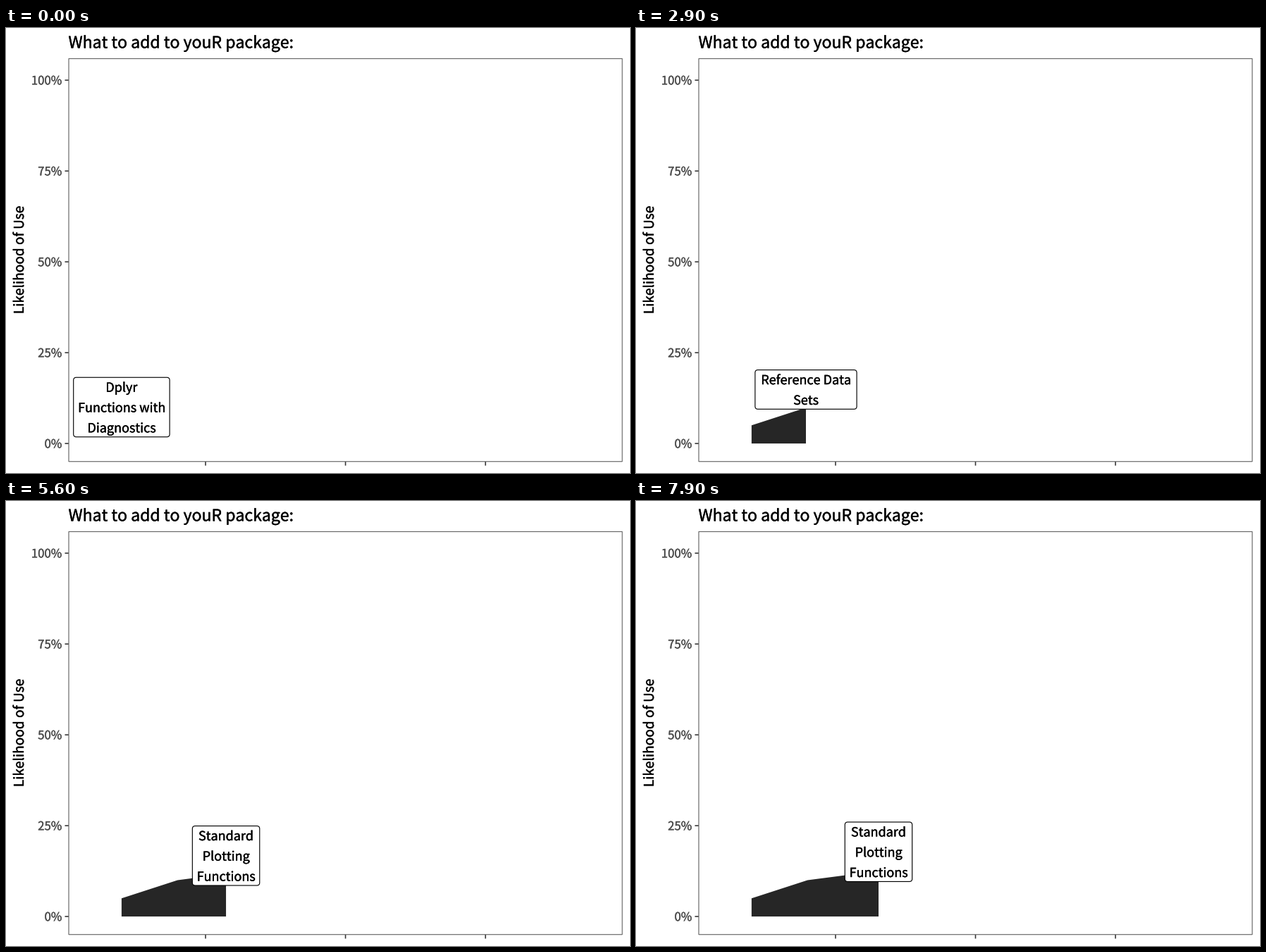
Recreate the animation shown at these times as a matplotlib script. Size 885 by 632 pixels, loop 8000 ms.

```python
import matplotlib.pyplot as plt
from matplotlib.animation import FuncAnimation
from matplotlib.patches import FancyBboxPatch, Polygon, Rectangle
from matplotlib.patheffects import withStroke

WIDTH, HEIGHT, DPI = 885, 632, 64
PT = 72 / DPI  # points per pixel
FRAMES, INTERVAL = 80, 100

plt.rcParams["font.family"] = ["Noto Sans CJK JP", "DejaVu Sans"]

KEY_FRAMES = [4, 35, 66, 98]
SCORES = [5, 10, 12, 15]
# lines of text and box width
LABELS = [
    (["Dplyr", "Functions with", "Diagnostics"], 136.4),
    (["Reference Data", "Sets"], 144.2),
    (["Standard", "Plotting", "Functions"], 95.4),
]
LINE_HEIGHT = 28.8
NUDGE = 5


def px(x):
    return 283 + (x - 2.5) * 79.4


def py(percent):
    return 590.1 - percent * 5.16


def ease(p):
    return 4 * p**3 if p < 0.5 else 1 - 4 * (1 - p) ** 3


fig = plt.figure(figsize=(WIDTH / DPI, HEIGHT / DPI), dpi=DPI, facecolor="white")
ax = fig.add_axes([0, 0, 1, 1])
ax.set(xlim=(0, WIDTH), ylim=(HEIGHT, 0))
ax.axis("off")


def text(x, y, s, size, color="black", **kw):
    """Slightly emboldened text on its baseline."""
    return ax.text(x, y, s, fontsize=size * PT, color=color, va="baseline",
                   path_effects=[withStroke(linewidth=0.35 * PT, foreground=color)],
                   **kw)


def tick(xs, ys):
    ax.plot(xs, ys, color="#333333", lw=1.6 * PT, solid_capstyle="butt",
            snap=False, zorder=1)


text(88.5, 28.4, "What to add to youR package:", 23)
text(25, 329.5, "Likelihood of Use", 19.1, rotation=90,
     rotation_mode="anchor", ha="center")
for percent in range(0, 101, 25):
    y = py(percent)
    tick([83.5, 89], [y, y])
    text(79.3, y + 6.2, f"{percent}%", 16.8, "#4d4d4d", ha="right")
for x in (2.5, 5, 7.5):
    tick([px(x)] * 2, [616, 621.5])

area = ax.add_patch(Polygon([(0, 0)] * 3, fc="#262626", lw=0, snap=False, zorder=2))
box = ax.add_patch(FancyBboxPatch(
    (0, 0), 1, 1, boxstyle="round,pad=0,rounding_size=4",
    fc="white", ec="black", lw=1.15 * PT, zorder=3))
rows = [text(0, 0, "", 18, ha="center", zorder=4) for _ in range(3)]
ax.add_patch(Rectangle((89, 43.5), 785, 572.2, fill=False, ec="#6a6a6a",
                       lw=1.2 * PT, snap=False, zorder=5))


def state(frame):
    """Segment index, eased progress and label index at a frame."""
    frame = max(frame, KEY_FRAMES[0])
    seg = max(i for i in range(3) if KEY_FRAMES[i] <= frame)
    p = (frame - KEY_FRAMES[seg]) / (KEY_FRAMES[seg + 1] - KEY_FRAMES[seg])
    return seg, ease(p), seg + (p >= 0.5)


def update(frame):
    seg, e, label = state(frame)
    score = SCORES[seg] + (SCORES[seg + 1] - SCORES[seg]) * e
    x = px(1 + seg + e)

    outline = [(px(1 + i), py(SCORES[i])) for i in range(seg + 1)]
    area.set_xy([(px(1), py(0)), *outline, (x, py(score)), (x, py(0))])
    area.set_visible(x > px(1))

    lines, width = LABELS[label]
    height = LINE_HEIGHT * len(lines) - 1.9
    center = py(score + NUDGE)
    box.set_bounds(x - width / 2, center - height / 2, width, height)
    for i, row in enumerate(rows):
        row.set_text(lines[i] if i < len(lines) else "")
        offset = (i - (len(lines) - 1) / 2) * LINE_HEIGHT
        row.set_position((x, center + offset + 7))
    return [area, box, *rows]


anim = FuncAnimation(fig, update, frames=FRAMES, interval=INTERVAL,
                     repeat=True, repeat_delay=0)
plt.show()
```
